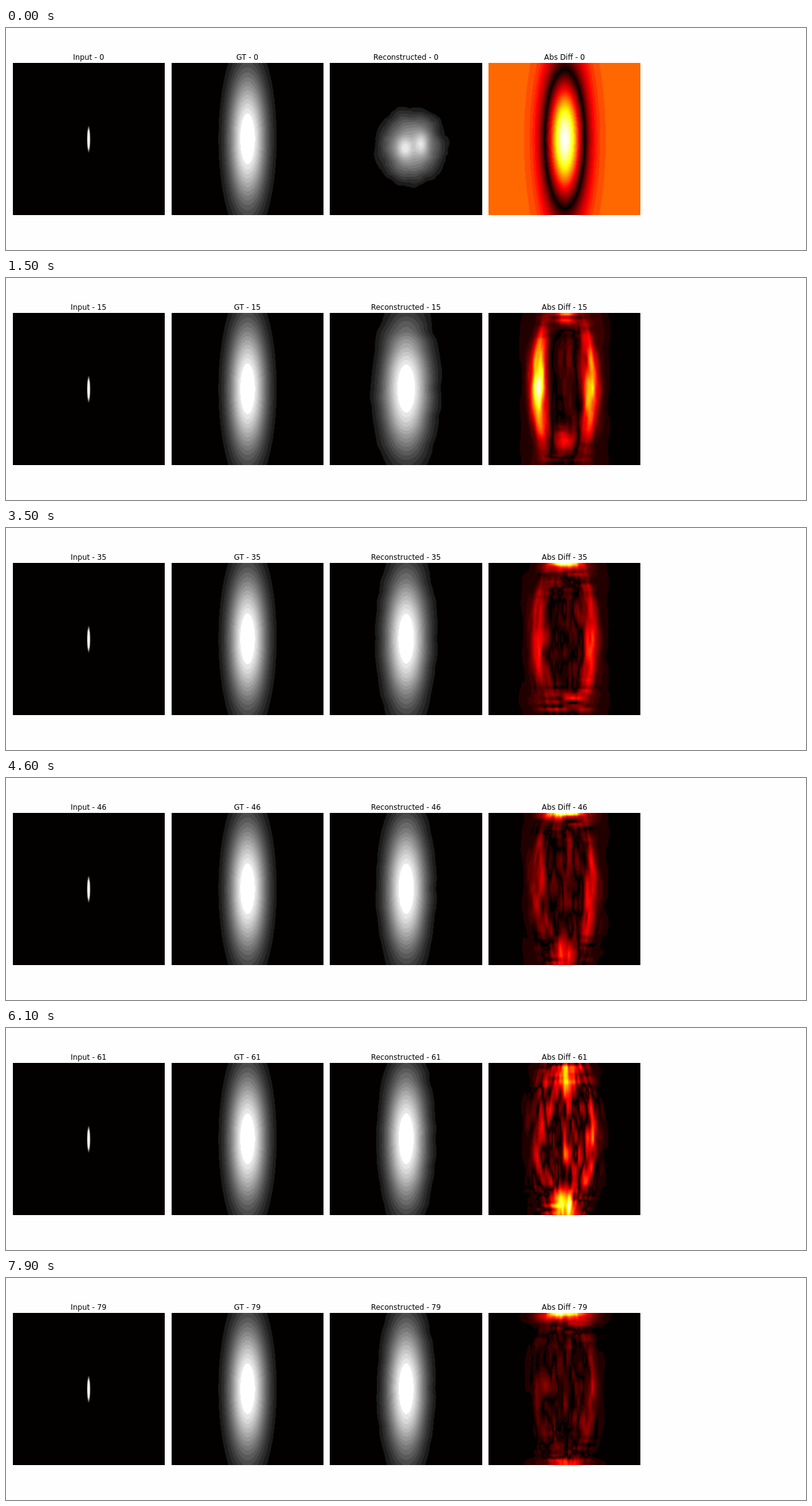
Recreate the animation shown at these times as an HTML page with a canvas. Size 1280 by 356 pixels, loop 8 s.

```html
<!DOCTYPE html>
<html lang="en">
<head>
<meta charset="utf-8">
<title>Reconstruction progress</title>
<style>
  html, body { margin: 0; width: 1280px; height: 356px; overflow: hidden; background: #fefefe; }
  canvas, svg { position: absolute; left: 0; top: 0; }
  text { font: 11.8px "DejaVu Sans", sans-serif; text-anchor: middle; fill: #000; }
</style>
</head>
<body>
<canvas id="view" width="1280" height="356"></canvas>
<svg width="1280" height="356">
  <text x="132.2" y="51"></text>
  <text x="386.1" y="51"></text>
  <text x="639.9" y="51"></text>
  <text x="893.7" y="51"></text>
</svg>
<script>
const SIZE = 243, LEFT = 10.7, TOP = 56.4, PITCH = 253.8;
const STEPS = 80, STEP_MS = 100;
const CX = 121.4, CY = 120.6, SX = 21.8, SY = 76;
const names = ['Input', 'GT', 'Reconstructed', 'Abs Diff'];
const labels = document.querySelectorAll('text');
const ctx = document.getElementById('view').getContext('2d');
const buffer = document.createElement('canvas');
buffer.width = buffer.height = SIZE;
const bufferCtx = buffer.getContext('2d');
const image = bufferCtx.createImageData(SIZE, SIZE);

// Error shape per epoch; top and bottom spots hold amplitude, y, width, height.
const KEYS = [
  // epoch left right core  top spot            bottom spot       streaks rows outer
  [15, 1.00, .66, -.20,  .55, -114, 10,  8,   -.42,  82, 12, 14,   .08, .10, .065],
  [28,  .56, .45, -.10, -.66,  -97, 15, 19,   -.88,  92, 15, 22,   .22, .24, .050],
  [35,  .46, .46, -.12, 1.00, -122, 17,  8,    .22,  96, 30, 14,   .17, .24, .050],
  [46,  .25, .36, -.18, 1.00, -122, 22,  8,   -.45, 108, 15, 24,   .22, .24, .050],
  [61,  .18, .24, -.10, -.55, -100, 25, 22,   -.80, 108, 14, 24,   .34, .34, .025],
  [79,  .13, .17, -.10,  .90, -119, 27,  9,    .70, 120, 24,  5,   .20, .20, .020]
];

const clamp = v => Math.max(0, Math.min(1, v));
const gauss = (x, y, sx, sy) => Math.exp(-(x * x / (sx * sx) + y * y / (sy * sy)) / 2);

function hash(x, y, seed) {
  let h = Math.imul(x, 374761393) + Math.imul(y, 668265263) + Math.imul(seed, 974634777);
  h = Math.imul(h ^ (h >>> 13), 1274126177);
  return ((h ^ (h >>> 16)) >>> 0) / 2147483648 - 1;
}

function noise(x, y, seed) {
  const i = Math.floor(x), j = Math.floor(y);
  let u = x - i, v = y - j;
  u *= u * (3 - 2 * u);
  v *= v * (3 - 2 * v);
  const a = hash(i, j, seed), b = hash(i + 1, j, seed);
  const c = hash(i, j + 1, seed), d = hash(i + 1, j + 1, seed);
  return a + (b - a) * u + (c - a + (a - b - c + d) * u) * v;
}

const drift = (x, y, seed, epoch) =>
  .75 * noise(x, y, seed) + .55 * noise(x, y, seed + 7 * epoch + 11);

const BLACK = [3, 0, 0];
const gray = v => v ? [v * 255, v * 255, v * 255] : BLACK;
const hot = v => v ? [
  255 * clamp(.0416 + v * 2.626),
  255 * clamp((v - .365) / .381),
  255 * clamp((v - .746) / .254)
] : BLACK;

// Filled contour bands of a bell with peak 1.
function bands(g) {
  const n = Math.floor((g - .103) / .0545);
  return n < 0 ? 0 : n > 13 ? 1 : .11 + .061 * n;
}

function paint(panel, field, colour) {
  const px = image.data, x0 = LEFT + panel * PITCH;
  for (let y = 0, k = 0; y < SIZE; y++) {
    for (let x = 0; x < SIZE; x++, k += 4) {
      const c = colour(field(x, y));
      px[k] = c[0];
      px[k + 1] = c[1];
      px[k + 2] = c[2];
      px[k + 3] = 255;
    }
  }
  bufferCtx.putImageData(image, 0, 0);
  ctx.clearRect(Math.floor(x0), 56, SIZE + 2, SIZE + 2);
  ctx.drawImage(buffer, x0, TOP, SIZE + .2, SIZE + .2);
}

function inputField(x, y) {
  return clamp((1 - Math.hypot((x - 120.9) / 2.8, (y - 121.4) / 22.5)) * 2.6);
}

const truthField = (x, y) => bands(gauss(x - CX, y - CY, SX, SY));

const early = epoch => Math.max(0, 1 - epoch / 10) ** 2;

function blob(x, y) {
  const wob = 1 + .06 * noise(x / 22, y / 22, 5) + .03 * noise(x / 9, y / 6, 6);
  const r = Math.hypot((x - 129.5) / 58, (y - 132.5) / 64) * wob;
  return .56 * Math.exp(-1.65 * r ** 3) +
    .31 * gauss(x - 119.5, y - 135.5, 9, 12) +
    .29 * gauss(x - 145.5, y - 129, 8, 13);
}

function reconField(epoch) {
  const w = early(epoch), wide = Math.exp(-(Math.max(epoch, 12) - 15) / 17);
  const sx = 21.9 + 4.4 * wide, sy = 76 - 4 * wide;
  const rough = .02 + .03 * wide;
  return (x, y) => {
    const dx = x - CX, dy = y - CY;
    let g = 0;
    if (w < 1 && Math.abs(dx) < 75) {
      const n = drift(x / 40, y / 15, 3, epoch);
      const r = Math.hypot(dx / sx, dy / sy);
      const q = r * (1 + rough * n * r / 2);
      g = Math.exp(-q * q / 2);
    }
    return bands(w ? g * (1 - w) + blob(x, y) * w : g);
  };
}

function keyAt(epoch) {
  let i = 0;
  while (i < KEYS.length - 2 && KEYS[i + 1][0] <= epoch) i++;
  const a = KEYS[i], b = KEYS[i + 1];
  const u = clamp((epoch - a[0]) / (b[0] - a[0]));
  return a.map((v, n) => v + (b[n] - v) * u);
}

function diffField(epoch) {
  const [, left, right, core, ta, ty, tw, th, ba, by, bw, bh, streak, rows, outer] = keyAt(epoch);
  const w = early(epoch);
  const err = new Float32Array(SIZE * SIZE);
  let max = 0;
  for (let y = 0; y < SIZE; y++) {
    const dy = y - CY;
    const bow = Math.sqrt(1 - (dy / 165) ** 2);
    const edge = clamp((Math.abs(dy) - 55) / 50);
    for (let x = 0; x < SIZE; x++) {
      const dx = x - CX;
      let e = 0;
      if (w < 1 && Math.abs(dx) < 100) {
        const xr = dx / bow;
        const fine = drift(xr / 9, y / 38, 1, epoch) + .6 * drift(xr / 4.5, y / 24, 8, epoch);
        const flat = drift(x / 27, y / 6, 2, epoch);
        const soft = noise(x / 16, y / 30, 4);
        const inside = Math.exp(-((xr / 53) ** 4));
        const lobe = dx < 0
          ? left * gauss(xr + 43, dy + 5, 8.5, 56)
          : right * gauss(xr - 41, dy + 7, 9, 56);
        e = lobe * (1 + .2 * fine) +
          core * Math.exp(-((xr / 23) ** 4) - (dy / 105) ** 4) * (.8 + .5 * soft) +
          ta * gauss(dx - 2, dy - ty, tw, th) * (1 + .35 * flat) +
          ba * gauss(dx, dy - by, bw, bh) * (1 + .4 * flat) +
          inside * (streak * fine * (1 - .4 * edge) + rows * flat * edge) +
          outer * Math.exp(-((dx / 69) ** 8)) * (1 + .6 * soft);
      }
      if (w) e = e * (1 - w) - w * (gauss(dx, dy - .5, SX, SY) - .341) / .659;
      e = Math.abs(e);
      err[y * SIZE + x] = e;
      if (e > max) max = e;
    }
  }
  return (x, y) => Math.round(err[y * SIZE + x] / max * 27) / 27;
}

function show(epoch) {
  labels.forEach((el, i) => { el.textContent = `${names[i]} - ${epoch}`; });
  paint(2, reconField(epoch), gray);
  paint(3, diffField(epoch), hot);
}

paint(0, inputField, gray);
paint(1, truthField, gray);

let shown = -1, start = null;
function tick(now) {
  if (start === null) start = now;
  const epoch = Math.floor((now - start) / STEP_MS) % STEPS;
  if (epoch !== shown) show(shown = epoch);
  requestAnimationFrame(tick);
}
show(shown = 0);
requestAnimationFrame(tick);
</script>
</body>
</html>
```
